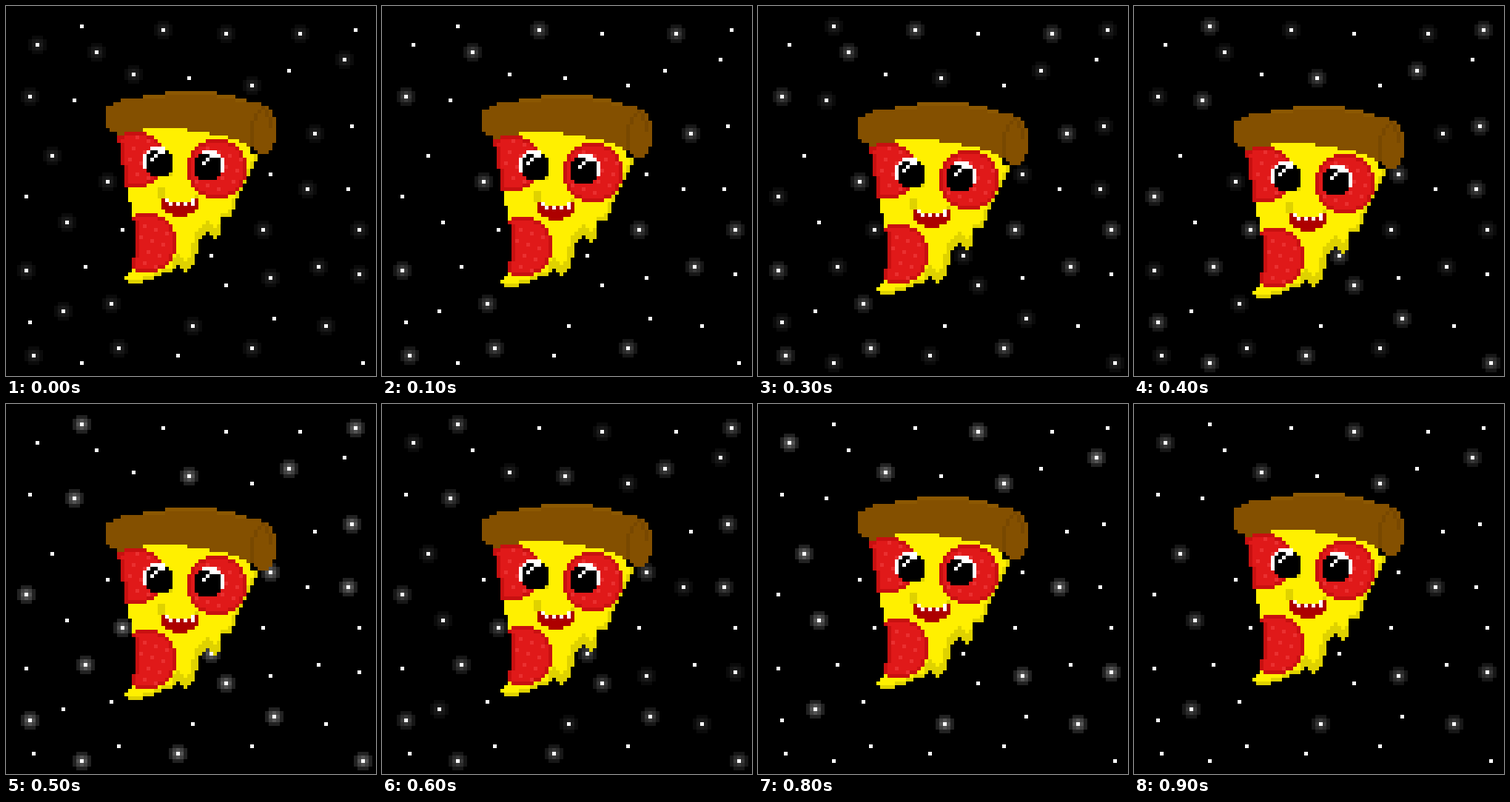
These frames come from a looping animation (500 px wide and 500 px high, 1000 ms). An HTML page with a canvas:

```html
<!DOCTYPE html>
<html>
<head>
<meta charset="utf-8">
<style>
html, body { margin: 0; height: 100%; overflow: hidden; background: #000; }
canvas { display: block; width: 100vw; height: 100vh; image-rendering: pixelated; }
</style>
</head>
<body>
<canvas id="stage" width="100" height="100"></canvas>
<script>
const ctx = document.getElementById('stage').getContext('2d');
const sprite = document.createElement('canvas');
sprite.width = sprite.height = 100;
const pen = sprite.getContext('2d');

// Three groups of stars that glow in turn
const stars = [
  { peak: 2, at: [
    [42, 6], [79, 7], [24, 12], [6, 24], [83, 34], [27, 47], [69, 60],
    [95, 60], [5, 71], [84, 70], [28, 80], [7, 94], [30, 92], [66, 92]] },
  { peak: 5, at: [
    [20, 5], [94, 6], [76, 17], [49, 19], [18, 25], [93, 32],
    [71, 45], [5, 51], [92, 49], [31, 60], [55, 67], [21, 70],
    [59, 75], [72, 84], [6, 85], [20, 96], [46, 94], [96, 96]] },
  { peak: 8, at: [
    [8, 10], [59, 7], [34, 18], [91, 14], [66, 21], [12, 40], [81, 49],
    [16, 58], [71, 73], [95, 72], [15, 82], [50, 86], [86, 86]] }
];

// Value of the first stair whose limit lies beyond v
const stair = (v, steps) => (steps.find(([limit]) => v < limit) || [0, 0])[1];

// Cheese outline, in cells
const drips = [71, 70, 71, 72, 71, 70, 67, 63, 62, 61, 62, 63, 62, 57, 57, 58, 56];
const left = y => stair(y, [[37, 30], [43, 31], [49, 32], [53, 33], [58, 34], [68, 35], [72, 34], [73, 33], [74, 32], [99, 33]]);
const right = y => y < 40 ? 66 : Math.round(68 - (y - 40) * .46);
const hem = x => x < 45 ? stair(x, [[37, 75], [40, 74], [42, 73], [45, 72]]) : drips[x - 45] || 56;
const body = (x, y) => y > 31 && x >= left(y) && x < right(y) && y < hem(x);
const shade = (x, y) => {
  const depth = x < 45 || x === 58 || x === 59 ? 1 : x === 50 || x === 51 ? 6 : 3;
  return body(x, y) && y > 39 && (x === right(y) - 1 || y >= hem(x) - depth);
};

// Crust outline
const crustTop = x => stair(x, [[27, 99], [29, 27], [31, 26], [37, 25], [43, 24], [57, 23], [62, 24], [65, 25], [69, 26], [71, 27], [72, 28], [73, 30]]);
const crustEnd = x => stair(x, [[28, 33], [30, 34], [32, 35], [37, 34], [49, 33], [55, 34], [60, 35], [63, 36], [65, 37], [67, 38], [68, 39], [71, 40], [72, 39], [73, 37]]);
const crust = (x, y) => y >= crustTop(x) && y < crustEnd(x);

const disc = (cx, cy, r) => (x, y) => Math.hypot(x + .5 - cx, y + .5 - cy) < r;
const both = (a, b) => (x, y) => a(x, y) && b(x, y);
const edge = s => (x, y) => s(x, y) && !(s(x - 1, y) && s(x + 1, y) && s(x, y - 1) && s(x, y + 1));

function paint(color, shape) {
  pen.fillStyle = color;
  for (let y = 20; y < 78; y++)
    for (let x = 25; x < 75; x++)
      if (shape(x, y)) pen.fillRect(x, y, 1, 1);
}

function box(color, x, y, w = 1, h = 1) {
  pen.fillStyle = color;
  pen.fillRect(x, y, w, h);
}

function eye(x, y, dx) {
  paint('#fff', disc(x, y, 4.2));
  paint('#000', disc(x + dx, y + .5, 3.7));
  box('#fff', x - 2, y - 1);
  box('#fff', x - 1, y - 2);
  box('#fff', x, y - 3, 2);
}

function drawMouth() {
  const red = '#ad0000';
  box(red, 42, 52, 10, 3);
  box(red, 43, 55, 8);
  box(red, 45, 56, 4);
  box('#fff000', 44, 52, 6);
  box('#fff', 43, 52);
  box('#fff', 50, 52);
  for (let x = 44; x <= 50; x += 2) box('#fff', x, 53);
}

function drawPizza() {
  const dark = '#dfd200';
  paint('#fff000', body);
  paint(dark, shade);
  box(dark, 44, 40, 1, 6);
  box(dark, 41, 49, 2, 3);
  box(dark, 51, 51);

  for (const [x, y, r] of [[35, 41.5, 7.8], [57, 44, 8.1], [38, 64, 8.1]]) {
    const slice = both(body, disc(x, y, r));
    paint('#e01919', slice);
    paint('#ea3030', both(slice, (x, y) => (3 * x + y) % 10 === 0));
    paint('#c81010', edge(slice));
  }

  eye(41, 42, .5);
  eye(55, 43, -.5);
  drawMouth();

  paint('#845000', crust);
  paint('#8c5802', (x, y) => x > 36 && x < 65 && y === crustTop(x));
  box('#784800', 69, 27);
  box('#784800', 68, 28);
  box('#784800', 67, 29, 1, 2);
  box('#784800', 66, 31, 1, 7);
  box('#784800', 70, 28, 1, 2);
  box('#784800', 71, 30, 1, 3);
}

function drawStar(x, y, glow) {
  for (let j = -2; j <= 2; j++)
    for (let i = -2; i <= 2; i++) {
      const d = i * i + j * j;
      if (d > 5) continue;
      const a = d ? glow * (d < 2 ? .11 : d < 3 ? .085 : .045) : 1;
      ctx.fillStyle = `rgba(255, 255, 255, ${a})`;
      ctx.fillRect(x + i, y + j, 1, 1);
    }
}

function draw(now) {
  const step = Math.floor(now / 100) % 10;
  ctx.fillStyle = '#000';
  ctx.fillRect(0, 0, 100, 100);
  for (const { peak, at } of stars) {
    const gap = Math.abs(step - peak);
    const glow = Math.max(0, 3 - Math.min(gap, 10 - gap));
    for (const [x, y] of at) drawStar(x, y, glow);
  }
  ctx.drawImage(sprite, 0, 5 - Math.abs(5 - step));
  requestAnimationFrame(draw);
}

drawPizza();
draw(performance.now());
</script>
</body>
</html>
```
